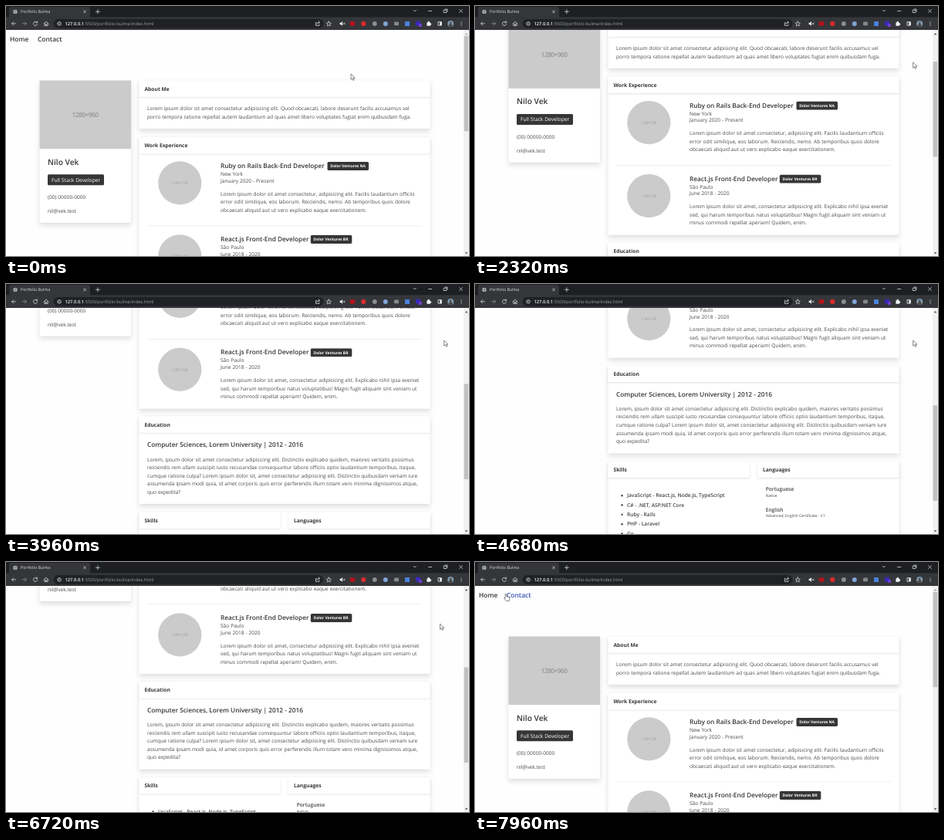
These frames come from a looping animation (600 px wide and 324 px high, 8 s). An HTML page:

```html
<!DOCTYPE html>
<html lang="en">
<head>
<meta charset="utf-8">
<title>Portfolio Bulma</title>
<style>
html, body { margin: 0; width: 100%; height: 100%; overflow: hidden; background: #fefefe; }
svg { display: block; width: 600px; height: 324px; }
text { font-family: "Open Sans", "Noto Sans", sans-serif; text-rendering: geometricPrecision; white-space: pre; }
.body { font-size: 6.58px; word-spacing: .22px; fill: #4a4a4a; }
.head { font-size: 6.7px; font-weight: 700; fill: #363636; }
.title { font-size: 8.25px; font-weight: 600; fill: #363636; }
.nav { font-size: 8.45px; font-weight: 600; fill: #363636; }
.name { font-size: 10.2px; font-weight: 600; fill: #363636; }
.strong { font-size: 6.65px; font-weight: 600; fill: #424242; }
.small { font-size: 5px; fill: #424242; }
.role { font-size: 6.75px; fill: #fff; }
.tag { font-size: 4.95px; font-weight: 700; fill: #fff; }
.size { font-size: 8.5px; letter-spacing: -.6px; font-weight: 600; fill: #969696; text-anchor: middle; }
.dim { font-size: 5px; fill: #9c9c9c; text-anchor: middle; }
.tab { font-size: 5.25px; fill: #dfe1e5; }
.url { font-size: 5.8px; fill: #9aa0a6; }
.host { font-weight: 600; fill: #f1f3f4; }
.line { fill: none; stroke: #d5d7da; stroke-width: .8; stroke-linecap: round; stroke-linejoin: round; }
</style>
</head>
<body>
<svg viewBox="0 0 600 324" xmlns="http://www.w3.org/2000/svg">
  <defs>
    <filter id="cardShadow" x="-10%" y="-20%" width="120%" height="150%">
      <feDropShadow dx="0" dy="3.5" stdDeviation="3.4" flood-color="#0a0a0a" flood-opacity=".12"/>
    </filter>
    <filter id="headShadow" x="-5%" y="-30%" width="110%" height="170%">
      <feDropShadow dx="0" dy=".9" stdDeviation=".9" flood-color="#0a0a0a" flood-opacity=".13"/>
    </filter>
  </defs>
  <rect width="600" height="324" fill="#fefefe"/>
  <g id="page"></g>
  <g id="scrollbar">
    <rect x="593" y="30" width="7" height="294" fill="#f1f1f1"/>
    <rect id="thumb" x="593.6" width="5.6" height="123.4" fill="#c1c1c1"/>
    <path id="up" d="M594.8 37.2l1.8-2.2 1.8 2.2z"/>
    <path id="down" d="M594.8 319.2l1.8 2.2 1.8-2.2z"/>
  </g>
  <g id="chrome"></g>
  <path id="arrow" d="M0 0V7.3L1.7 5.7L2.9 8.4L4.1 7.9L3 5.3H5.3Z" fill="#fff" stroke="#3c3c3c" stroke-width=".6"/>
  <path id="hand" d="M-.8 .6Q0-.6 .8 .6V3.6L4 4.4Q5 4.8 4.9 6L4.3 9.4H.2L-2.3 6.2Q-2.4 4.9-.8 5.7Z" fill="#fff" stroke="#3c3c3c" stroke-width=".6"/>
</svg>
<script>
const NS = 'http://www.w3.org/2000/svg';
const LOOP = 8000, STEP = 40, NOTCH = 43.9, MAX_SCROLL = 364;
const $ = id => document.getElementById(id);
const page = $('page'), chrome = $('chrome');

function add(parent, tag, attrs, content) {
  const node = document.createElementNS(NS, tag);
  for (const key in attrs) node.setAttribute(key, attrs[key]);
  if (content) node.textContent = content;
  parent.appendChild(node);
  return node;
}
const text = (cls, x, y, content, parent = page) => add(parent, 'text', { class: cls, x, y }, content);
const rect = (x, y, width, height, fill, rx = 0, parent = page) =>
  add(parent, 'rect', { x, y, width, height, fill, rx });
const disc = (cx, cy, r, fill, parent = page) => add(parent, 'circle', { cx, cy, r, fill });
const lines = (x, y, rows) => rows.forEach((row, i) => text('body', x, y + i * 10.55, row));
const icon = d => add(chrome, 'path', { class: 'line', d });

function card(x, y, w, h) {
  const box = rect(x, y, w, h, '#fff', 1);
  box.setAttribute('filter', 'url(#cardShadow)');
  box.setAttribute('stroke', 'rgba(10,10,10,.03)');
  box.setAttribute('stroke-width', .5);
}
function header(x, y, w, label) {
  rect(x, y, w, 21.2, '#fff', 1).setAttribute('filter', 'url(#headShadow)');
  text('head', x + 7, y + 13.2, label);
}
function job(y, role, tagX, company, place, dates, rows) {
  disc(225.3, y + 22.4, 28.1, '#cbcbcb');
  text('dim', 225.3, y + 24.4, '128×128');
  text('title', 278, y + 3, role);
  rect(tagX, y - 5, 53.5, 10.9, '#363636', 1.6);
  text('tag', tagX + 3.8, y + 2.3, company);
  text('body', 278, y + 13, place);
  text('body', 278, y + 21.8, dates);
  lines(278, y + 38.6, rows);
}

function buildPage() {
  text('nav', 5, 46, 'Home');
  const contact = text('nav', 41, 46, 'Contact');

  card(43.5, 96.5, 118.5, 184.5);
  rect(43.5, 96.5, 118.5, 88.7, '#cbcbcb');
  text('size', 102.6, 144.2, '1280×960');
  text('name', 54, 205.7, 'Nilo Vek');
  rect(54, 218.3, 73, 14, '#363636', 1.6);
  text('role', 59, 227.7, 'Full Stack Developer');
  text('body', 54, 250.4, '(00) 00000-0000');
  text('body', 54, 268.2, 'nil@vek.test');

  card(172.5, 96.5, 377, 62.5);
  header(172.5, 96.5, 377, 'About Me');
  lines(183, 135.3, [
    'Lorem ipsum dolor sit amet consectetur adipisicing elit. Quod obcaecati, labore deserunt facilis accusamus vel',
    'porro tempora ratione repellat autem laudantium ad quas amet libero voluptates fugiat enim quibusdam fuga.']);

  card(172.5, 170, 377, 205);
  header(172.5, 170, 377, 'Work Experience');
  job(207, 'Ruby on Rails Back-End Developer', 416.5, 'Dolor Ventures NA', 'New York', 'January 2020 - Present', [
    'Lorem ipsum dolor sit amet consectetur, adipisicing elit. Facilis laudantium officiis',
    'error odit similique, eos laborum. Reiciendis, nemo. Ab temporibus quos dolore',
    'obcaecati aliquid aut ut vero explicabo eaque exercitationem.']);
  rect(183, 284.6, 356, .6, '#e4e4e4');
  job(302, 'React.js Front-End Developer', 394.8, 'Dolor Ventures BR', 'São Paulo', 'June 2018 - 2020', [
    'Lorem ipsum dolor sit amet, consectetur adipisicing elit. Explicabo nihil ipsa eveniet',
    'sed, qui harum temporibus natus voluptatibus! Magni fugit aliquam sint veniam ut',
    'minus commodi repellat aperiam! Quidem, enim.']);

  card(172.5, 385, 377, 113.5);
  header(172.5, 385, 377, 'Education');
  text('title', 183, 424.9, 'Computer Sciences, Lorem University | 2012 - 2016');
  lines(183, 443.2, [
    'Lorem, ipsum dolor sit amet consectetur adipisicing elit. Distinctio explicabo quidem, maiores veritatis possimus',
    'reiciendis rem ullam suscipit iusto recusandae consequuntur labore officiis optio laudantium temporibus, itaque,',
    'cumque ratione culpa? Lorem ipsum dolor sit, amet consectetur adipisicing elit. Distinctio quibusdam veniam iure',
    'assumenda ipsam modi quia, id amet corporis quis error perferendis illum totam vero minima dignissimos atque,',
    'quo expedita?']);

  card(172.5, 509, 377, 163);
  header(172.5, 509, 183.5, 'Skills');
  header(366, 509, 183.5, 'Languages');
  ['JavaScript - React.js, Node.js, TypeScript', 'C# - .NET, ASP.NET Core', 'Ruby - Rails', 'PHP - Laravel',
    'Go', 'Elixir', 'Python', 'SQL - MySQL, PostgreSQL', 'NoSQL - MongoDB'].forEach((skill, i) => {
    const y = 555.5 + i * 12.33;
    disc(190.5, y - 2, 1.2, '#424242');
    text('strong', 197, y, skill);
  });
  text('strong', 376.7, 547.3, 'Portuguese');
  text('small', 376.7, 555.2, 'Native');
  text('strong', 376.7, 573.8, 'English');
  text('small', 376.7, 581.4, 'Advanced, English Certificate - C1');
  return contact;
}

function buildChrome() {
  const block = (x, y, w, h, fill, rx) => rect(x, y, w, h, fill, rx, chrome);
  const dot = (x, y, r, fill) => disc(x, y, r, fill, chrome);
  block(0, 0, 600, 31, '#1d1f23');
  block(4, 1, 105, 16, '#35363a', 3);
  block(0, 14.3, 600, 16.7, '#35363a');
  dot(12, 7.4, 2.6, '#c4c7cb');
  add(chrome, 'path', { d: 'M9.6 7.4h4.8M12 4.9q-2 2.5 0 5q2-2.5 0-5', fill: 'none', stroke: '#55585c', 'stroke-width': .5 });
  text('tab', 19, 9.3, 'Portfolio Bulma', chrome);
  icon('M100.6 6l2.8 2.8m0-2.8l-2.8 2.8M116.4 7.3h5m-2.5-2.5v5');
  icon('M528.2 5.4l1.6 1.6 1.6-1.6M547.6 6.5h4.2');
  icon('M567.6 5.2h3.3v3.3h-3.3zM568.8 4.1h3.2v3.2M587.6 4.6l3.8 3.8m0-3.8l-3.8 3.8');

  icon('M12.6 22.8h-5m2.2-2.2l-2.2 2.2 2.2 2.2');
  icon('M21.4 22.8h5m-2.2-2.2l2.2 2.2-2.2 2.2').setAttribute('stroke-opacity', .55);
  icon('M40.2 21.3a2.6 2.6 0 1 0 .4 2.2M40.6 19.9v1.7h-1.8');
  icon('M49 23l3-2.9 3 2.9M49.9 22.4v3.2h1.5v-2h1.2v2h1.5v-3.2');
  block(61.5, 17, 350, 11.8, '#202124', 5.9);
  icon('M66.8 22.9a2.3 2.3 0 1 0 4.6 0a2.3 2.3 0 1 0-4.6 0M69.1 22.7v1.2m0-2.3v.1').setAttribute('stroke-width', .6);
  const url = text('url', 76.5, 25, '', chrome);
  add(url, 'tspan', { class: 'host' }, '127.0.0.1');
  add(url, 'tspan', {}, ':5500/portfolio-bulma/index.html');
  icon('M402.6 21.4h-1.2v4h4.6v-1.4M402.9 23.6q.4-2.4 3.4-2.4m-1.3-1.4l1.5 1.4-1.5 1.4').setAttribute('stroke-width', .5);
  icon('M418.3 20l.9 1.9 2.1.3-1.5 1.5.4 2.1-1.9-1-1.9 1 .4-2.1-1.5-1.5 2.1-.3z').setAttribute('stroke-width', .6);

  add(chrome, 'path', { d: 'M432.6 21.8h1.4l2-1.8v5.8l-2-1.8h-1.4z', fill: '#f1f3f4' });
  icon('M437.3 21.9l1.8 1.9m0-1.9l-1.8 1.9');
  block(445.8, 20.2, 6.4, 5.4, '#b5121b');
  dot(463.3, 22.9, 3.1, '#d92b2b');
  dot(477.8, 22.9, 2.9, '#8b8f94');
  dot(491.8, 22.9, 3, '#7fa6d8');
  block(503, 20.6, 6, 4.6, '#85898e', 1);
  block(517, 20, 6, 6, '#4a83dd');
  block(531, 19.6, 6, 6, '#3a2bb8');
  block(535, 23, 4, 4, '#6b3fc9', .6);
  block(545.4, 21.2, 4.6, 4.6, '#f1f3f4', .6);
  dot(547.7, 20.9, 1.1, '#f1f3f4');
  dot(550.3, 23.5, 1.1, '#f1f3f4');
  block(559.6, 20.3, 5.2, 5.2, '#f1f3f4', .7);
  block(560.4, 21.1, 1.9, 3.6, '#35363a');
  dot(576.2, 22.9, 4, '#7f9db3');
  add(chrome, 'path', { d: 'M573.4 25.7q.8-3 2.8-3t2.8 3q-2.8 2.4-5.6 0', fill: '#4d4843' });
  dot(576.2, 21.7, 1.3, '#4d4843');
  [-2, 0, 2].forEach(d => dot(590, 22.9 + d, .6, '#d5d7da'));
}

const clamp = u => Math.min(1, Math.max(0, u));
const smooth = u => u * u * (3 - 2 * u);
const easeOut = u => 1 - (1 - u) ** 2;
const linear = u => u;

// Rows are [time, values..., easing into the row].
function track(rows, t) {
  const next = rows.findIndex(row => row[0] > t);
  if (next < 0) return rows[rows.length - 1].slice(1, -1);
  if (next === 0) return rows[0].slice(1, -1);
  const a = rows[next - 1], b = rows[next];
  const u = b[b.length - 1]((t - a[0]) / (b[0] - a[0]));
  return a.slice(1, -1).map((v, i) => v + (b[i + 1] - v) * u);
}

const wheelTimes = [1570, 2110, 2640, 3190, 3729, 4150, 4558, 5010, 5440];
const scrollUp = [[6090, 364, linear], [6720, 230, linear], [7560, 0, linear]];
const pointer = [
  [20, 447, 88, linear], [840, 574, 79, smooth], [1280, 567.7, 73, smooth],
  [5840, 567.7, 73, linear], [5960, 563.4, 78, smooth],
  [6100, 563.4, 78, linear], [6300, 562.5, 80, smooth],
  [7580, 562.5, 80, linear], [7760, 532, 47, smooth], [7960, 40, 41, easeOut]
];

function scrollAt(t) {
  if (t >= scrollUp[0][0]) return track(scrollUp, t)[0];
  const turns = wheelTimes.reduce((sum, start) => sum + smooth(clamp((t - start) / 300)), 0);
  return Math.min(MAX_SCROLL, turns * NOTCH);
}

const contact = buildPage();
buildChrome();

function draw(now) {
  const t = Math.floor((now % LOOP) / STEP) * STEP;
  const scroll = scrollAt(t);
  const [x, y] = track(pointer, t);
  const hover = scroll < 1 && x > 37 && x < 78 && y > 34 && y < 53;
  page.setAttribute('transform', `translate(0 ${-scroll})`);
  $('thumb').setAttribute('y', 38.8 + scroll * .4246);
  $('up').setAttribute('fill', scroll > 0 ? '#505050' : '#a3a3a3');
  $('down').setAttribute('fill', scroll < MAX_SCROLL ? '#505050' : '#a3a3a3');
  contact.style.fill = hover ? '#3850b7' : '';
  $('arrow').style.display = hover ? 'none' : '';
  $('hand').style.display = hover ? '' : 'none';
  for (const id of ['arrow', 'hand']) $(id).setAttribute('transform', `translate(${x} ${y})`);
}

const start = performance.now();
(function tick() {
  draw(performance.now() - start);
  requestAnimationFrame(tick);
})();
</script>
</body>
</html>
```
